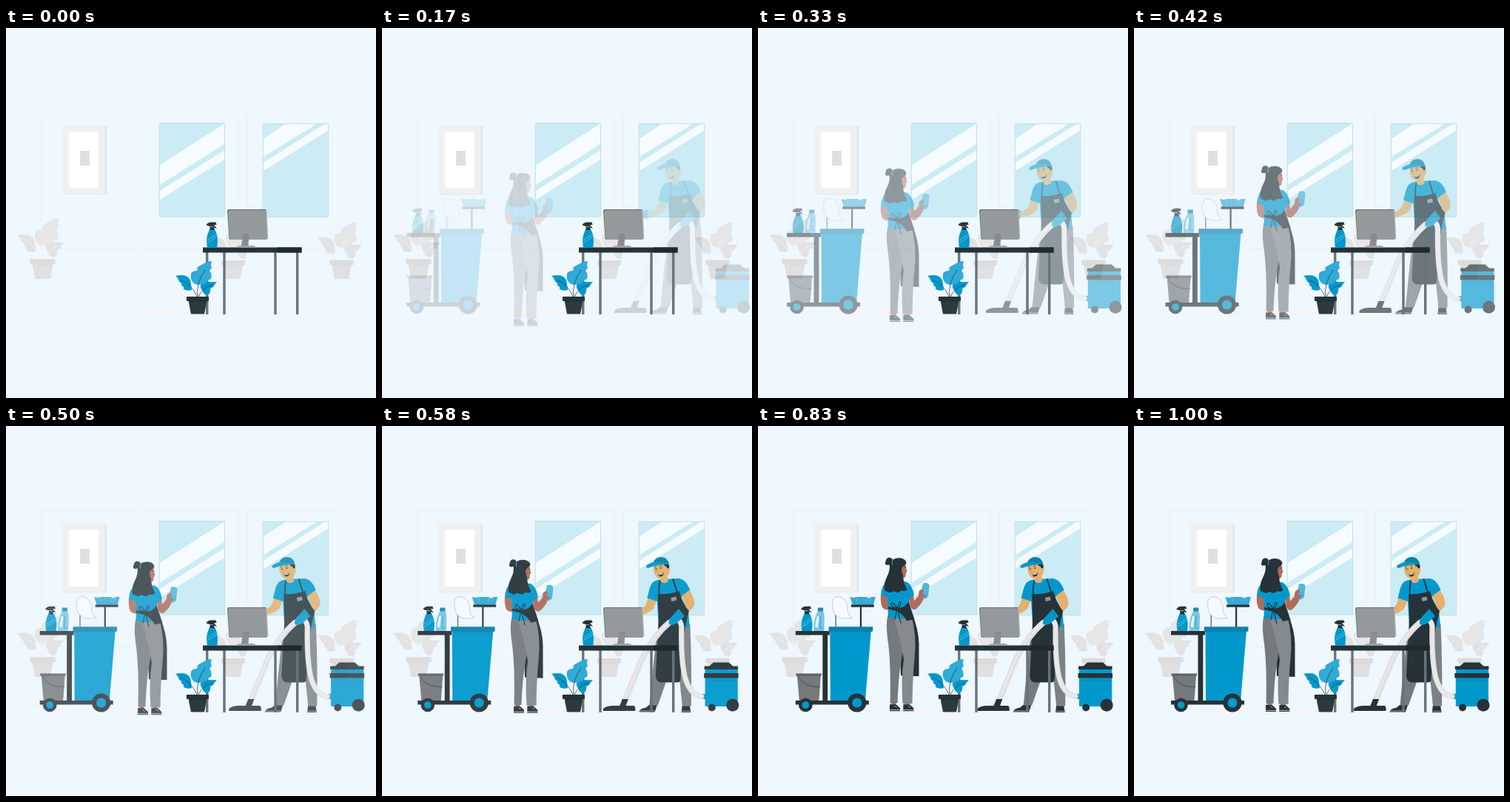
Animation, 500 px wide and 500 px high, one loop 1040 ms. Source, as an HTML page with a canvas:

```html
<!DOCTYPE html>
<html lang="en">
<head>
<meta charset="utf-8">
<title>Office cleaning</title>
<style>
html, body { margin: 0; width: 100%; height: 100%; overflow: hidden; background: #eff7ff; }
canvas { display: block; width: 100vw; height: 100vh; }
</style>
</head>
<body>
<canvas id="stage" width="500" height="500"></canvas>
<script>
const LOOP = 1040, FPS = 24, SIZE = 500;
const BLUE = '#0098cc', DEEP = '#0b80ab', DARK = '#263238', INK = '#1f2a30';
const GREY = '#7b8285', SKIN = '#b26b5b', PEACH = '#e5b06c';

const stage = document.getElementById('stage').getContext('2d');
let g = stage;

function fill(color, d) {
  g.fillStyle = color;
  g.fill(new Path2D(d));
}
function line(color, w, d) {
  g.strokeStyle = color;
  g.lineWidth = w;
  g.lineCap = g.lineJoin = 'round';
  g.stroke(new Path2D(d));
}
function rect(color, x, y, w, h, r = 0) {
  g.fillStyle = color;
  g.beginPath();
  g.roundRect(x, y, w, h, r);
  g.fill();
}
function oval(color, x, y, rx, ry = rx) {
  g.fillStyle = color;
  g.beginPath();
  g.ellipse(x, y, rx, ry, 0, 0, Math.PI * 2);
  g.fill();
}
function at(x, y, draw, s = 1) {
  g.save();
  g.translate(x, y);
  g.scale(s, s);
  draw();
  g.restore();
}
function layer(draw) {
  const c = document.createElement('canvas');
  c.width = c.height = SIZE;
  g = c.getContext('2d');
  draw();
  g = stage;
  return c;
}

// Pot base centre is the origin.
function plant(x, y, s, top, side, stem, rim, pot) {
  at(x, y, () => {
    g.translate(-259, -386.5);
    fill(side, 'M251 354Q246 356 240 353Q241 349 237 348Q238 344 234 343Q233 338 229 335Q238 333 243 335Q250 338 250 346Z');
    fill(side, 'M263 351Q262 344 268 342Q276 344 285 343Q281 347 280 350L276 352Q277 357 273 361Q267 361 266 356Z');
    fill(top, 'M255 346Q248 341 250 332Q252 328 258 328L259 323Q264 320 268 318Q272 315 278 315Q276 320 278 324L275 328Q279 333 277 339L273 341Q270 347 259 347Z');
    line(stem, .7, 'M259 363Q256 345 269 327M258 363Q253 349 237 340M260 363Q265 351 279 347');
    fill(pot, 'M246.5 368H271.5L268 386.5H250Z');
    rect(rim, 244, 363, 30, 6, .5);
    rect(rim, 248, 369, 22.5, 1.6);
  }, s);
}

function sprayBottle(x, y) {
  at(x, y, () => {
    fill(BLUE, 'M4 10H11Q15 17 15 25Q15 31 14 35H1Q0 29 0 24Q1 16 4 10Z');
    line('#7cc8e4', .8, 'M1 24.5Q7 22 12.5 16.5M1.5 27.5Q8 25 14 19');
    rect(DARK, 4.5, 6.5, 6, 4.5);
    fill(DARK, 'M-.5 4Q2 .5 6 .5H12.5L13.5 4H10L14 9L11 8L9 6H4L1 5Z');
  });
}

function windowPane(x, y, w, h, bands) {
  rect('#cbebf5', x, y, w, h);
  bands.forEach(d => fill('#f5fbff', d));
  line('#a9d3e1', .6, `M${x} ${y}h${w}v${h}h${-w}Z`);
}

function room() {
  rect('#eff7ff', 0, 0, SIZE, SIZE);
  [[47.5, 127.5], [187, 127.5], [326.5, 122.5]].forEach(([x, w]) =>
    line('#e9f0f6', .7, `M${x} 115.5h${w}v182.5h${-w}Z`));
  rect('#e3e4e5', 78, 132, 58, 93);
  rect('#f0f0f0', 76, 132, 57.5, 92.5);
  rect('#fff', 85, 140, 40, 76.5);
  rect('#e0e0e0', 100, 166, 13, 20);
  windowPane(207.5, 128.5, 88, 126.5, [
    'M208 185L295.5 129V156.5L208 212Z', 'M208 220L295.5 165V177.5L208 232Z']);
  windowPane(347.5, 129.3, 88, 126.2, [
    'M348 149.5L378 129.5H420L348 174Z', 'M348 181.5L431 129.5H435.5V138.5L348 193Z']);
  oval('#f4f5f7', 222, 385, 162, 4.2);
  const pale = ['#e6e6e6', '#e2e2e2', '#f0f0f0', '#dcdcdc', '#e0e0e0'];
  plant(49.5, 339, 1.14, ...pale);
  plant(307, 339, 1.06, ...pale);
  plant(453.5, 339, 1.07, ...pale);
}

function desk() {
  [270, 293.3, 362.3, 392].forEach(x => rect('#69737a', x, 302, 3.4, 85));
  rect(DARK, 266, 296.5, 133.5, 7);
  rect(INK, 367, 296.5, 32.5, 7);
  sprayBottle(271, 262);
  fill('#5d6367', 'M302 245H350Q352 245 352 247L353 283Q353 286 351 286H304Q302 286 301.5 284L299 248Q299 245 302 245Z');
  fill('#b4b8ba', 'M304 246H350Q352.5 246 352.5 249L354.3 283Q354.3 285.8 352 285.8H304Z');
  fill('#94999c', 'M302 245.8H349.5Q351.2 245.8 351.4 248.5L353 282Q353 285.3 350.5 285.3H304.5Q302.3 285.3 302.1 283L299.8 248.5Q300 245.8 302 245.8Z');
  fill('#888d91', 'M320.5 278H328.5L327.5 294.5H318Z');
  fill('#9a9fa2', 'M312 297Q312 294.3 316 294.2H334Q337 294.5 337.3 297Z');
  plant(259, 386.5, 1, '#30aad6', BLUE, DARK, DARK, '#2c393f');
}

function wheel(x, y, r) {
  oval(DARK, x, y, r);
  oval(BLUE, x, y, r * .52);
}

function cart() {
  const mop = 'M104 231Q113 229 118 238Q121 243 120 249Q121 256 126.5 259Q115 261 109 259Q101 255 100 246Q98 235 104 231Z';
  fill('#75797c', 'M52 337H84L81.5 371H55Z');
  rect('#5c6265', 50.5, 334.5, 34.5, 3);
  line('#3f484d', .9, 'M53 338Q62 354 83 352.5');
  line('#737a7e', 1.6, 'M104.3 250V271');
  fill('#f8fbfe', mop);
  line('#a3b3bc', .6, mop);
  rect(DARK, 137, 243, 2.2, 29);
  fill('#36a9d3', 'M123.5 231L129 232L132 231H146L149 233L152 231H158L155 242H127Z');
  line('#8fcfe6', .6, 'M132 232L133 237M146 232L145 238M152 232L150 237');
  rect(DARK, 125, 241.5, 31, 3.2);
  sprayBottle(57.7, 243.3);
  fill('#7cc6e3', 'M80 250H87Q89 253 89 258L88.5 277.5H74.5Q74 268 76 260Q78 254 80 250Z');
  rect('#1f86b0', 80, 245.5, 7.3, 5, 1);
  fill('#e4f4fb', 'M79 257Q82 256 81.5 260L80 272Q77 273 76.5 269Z');
  line('#45aed6', 1.6, 'M84 257L83 273H87');
  rect(DARK, 50, 277, 46, 5.6);
  rect(DARK, 86.5, 281, 6.8, 92);
  fill(BLUE, 'M96.5 277H152L144 372H97Z');
  fill(DEEP, 'M96.5 277H152L151.8 278.6H96.5Z');
  rect(DEEP, 94.8, 271.2, 59.6, 6.5, .6);
  rect(DARK, 50, 371, 99, 5.6);
  wheel(63.5, 377, 9.3);
  wheel(133, 374, 12.6);
}

function shoe(x) {
  at(x, 376, () => {
    fill(DARK, 'M0 1H8.5L14 6V10H0Z');
    line('#eef2f4', .7, 'M.5 8.4H13.5M7 3L9 5');
  });
}

function woman() {
  rect(SKIN, 180, 372, 6.5, 6);
  rect(SKIN, 198, 372, 7, 6);
  shoe(178);
  shoe(196.3);
  fill(DARK, 'M190 256L208 254Q217 275 217.5 295V339L193 338Z');
  fill('#747a7e', 'M175.5 256H204L196 305Q190 332 188.5 375H178.5Q180 320 175 287Q172.5 268 175.5 256Z');
  fill('#848a8d', 'M188 256H207Q215 284 211.5 315Q209 340 208.5 376H195.5Q193 342 197 316Q193 290 184 262Z');
  fill(SKIN, 'M166 228L175 230L176 243L178.5 249Q172 250 168 246Q165 239 166 228Z');
  fill(SKIN, 'M203.5 231L210 228L211 237L217 230L217.5 224L221 221L225 231Q222 241 213 248.5Q208 250 205.5 244Z');
  fill(BLUE, 'M174 212Q167 215 166 229.5L175 232L176 259Q190 263 206 259L204 235L211 229Q208 214 200 211Z');
  fill(DARK, 'M203.5 238L211.5 262L201 264Q197 256 188 251L176 248V245L189 247Q199 246 203.5 238Z');
  line(DARK, 1.1, 'M188 247Q181 236 180 241Q180 246 188 247Q191 235 193 240Q193 245 188 247L185 262M188 247L193 267');
  fill('#49b4db', 'M223 213.5Q229 211.5 231.5 216L230 230Q229 235 222 234L219.5 229Z');
  line('#7ac8e4', .8, 'M223 217L229 218M222 222L229 223');
  fill(SKIN, 'M216.5 229L222 221L224.5 223L221.5 228L227 229L223 234Z');
  fill(SKIN, 'M191 190Q196 185 199.5 187L200.5 194L201.5 197L200 199Q200 206 196 206.5L190 211Z');
  fill(DARK, 'M181 182Q187 178 194 179.5Q200 181 200.5 186L198 189L194.5 192Q193.5 198 196 202Q196 212 201.5 222Q198 225 194 223L189 226L183 224L178 226L171 223Q169 215 174 205Q179 196 177.5 187Z');
  oval(DARK, 177.5, 183.5, 4.8, 5);
  oval(DARK, 174.5, 186, 2.6);
  line('#36a9d3', 1, 'M182.3 181Q180.5 184 181.5 188');
  line(INK, .7, 'M198 192H199.5');
}

function vacuum() {
  line('#d8eaf3', 1.2, 'M480 345Q482 357 479.5 369');
  rect(BLUE, 428, 362, 8, 7, 1);
  fill(DARK, 'M439 326L446 319.5H467L474 326Z');
  rect(DARK, 433.8, 324.5, 45.6, 4.8, .6);
  rect(BLUE, 434.8, 329, 44.2, 50, 1.5);
  rect(DARK, 433.3, 334, 46.6, 6.5, .5);
  line(DEEP, .8, 'M437 343.5H477');
  oval(DARK, 444, 380.5, 5);
  oval(DARK, 472, 377.3, 8.5);
}

function man() {
  const hose = 'M385 267Q400 254 403 271Q402 315 407.5 339Q414 363 430 365.5';
  fill(DARK, 'M359 377H370L367 386.5H345.5Q346 382 355 380.5Z');
  fill(DARK, 'M404 377H414L415.5 387H402.8Z');
  line('#e4e9ec', .6, 'M346 385H367M403.5 385.4H414.5');
  fill('#747a7e', 'M369 285H393L382 346L371 377.5H359.5Q364 330 369 285Z');
  fill(GREY, 'M390 280L414.5 267Q417 325 416 378.5H404L399 330Z');
  rect(BLUE, 335, 246, 9, 12, 2);
  fill(PEACH, 'M358 231L369.5 235L365 247Q356 255 343 256L342 249Q351 247 355 241Z');
  fill(BLUE, 'M374 207.5Q363 208 360 219L356.5 232.5L370 237L372 272H414L412 248L402 232L414.5 222Q409 207 399 206Z');
  fill(PEACH, 'M403 230L413.5 222Q422 234 420 243L407 258L400 250L408.5 242Z');
  fill(DARK, 'M371 227Q386 228 400 223Q404 240 413 250Q406 275 404 300L401.5 343Q401 346.5 397 346.5H375Q369 346 368 338L372 262Z');
  line(DARK, 1.8, 'M374 210Q372 218 373 228M391.5 207L397 225');
  line('#3d494f', .7, 'M374 292L384 283');
  fill('#8b969c', 'M388.5 232L395.5 230.5L396.5 235.5L389.5 237Z');
  line('#e0e0e0', 8, 'M327 370L350 314Q366 283 386 266');
  line('#ebebeb', 2, 'M327.5 367L350 313Q366 283 384 267');
  line('#dedede', 7.2, hose);
  line('#e9e9e9', 4.8, hose);
  fill(BLUE, 'M399 247L407 257L398 265Q392 270.5 386 268Q384.5 262 391 256Z');
  line(DEEP, 1, 'M397.5 250L404 258M390 264L395 260');
  fill(DARK, 'M323 369H331L327.5 379H319Z');
  fill(DARK, 'M297 385V382Q302 378 310 378H338Q340 378 340.5 381V385Z');

  fill(PEACH, 'M366 186L384 186Q387 190 387 195Q386 201 384 203L385 210Q380 214 375 210.5V206.5Q368 206 366.5 199Q364 196 366 186Z');
  fill(INK, 'M379 185L386 186.5Q387 190 386 193L383.5 192Q383 189 380 189Z');
  oval(PEACH, 385.3, 195, 2, 2.8);
  oval(INK, 368.5, 193.3, .8, 1);
  oval(INK, 375.2, 192, .8, 1);
  line(INK, .7, 'M366.5 191L368.5 190M373.5 189.6L376 189');
  line('#c98b58', .7, 'M371 193L369.5 197L371.5 197.4');
  fill(INK, 'M371 200.5Q376 201 379 197.5Q379 203 374.5 203.5Q372 203 371 200.5Z');
  line('#fff', .9, 'M372.5 201Q376 201 378 199.3');
  fill(DEEP, 'M365 185Q367 177 376 177Q385.5 178 386 188Q376 184 365 187Z');
  fill(BLUE, 'M365 184Q374 183 386 187Q370 187 358 192Q354 191.5 355.5 188.5Q359 185.5 365 184Z');
}

// Keys are [frame, value]; smooth curve through them.
function track(keys, n) {
  const last = keys.length - 1;
  if (n >= keys[last][0]) return keys[last][1];
  let i = 0;
  while (n >= keys[i + 1][0]) i++;
  const slope = k => {
    const a = keys[Math.max(k - 1, 0)], b = keys[Math.min(k + 1, last)];
    return (b[1] - a[1]) / (b[0] - a[0]);
  };
  const [x0, y0] = keys[i], [x1, y1] = keys[i + 1];
  const h = x1 - x0, u = (n - x0) / h, v = 1 - u;
  return v * v * (1 + 2 * u) * y0 + u * u * (3 - 2 * u) * y1 +
    h * u * v * (v * slope(i) - u * slope(i + 1));
}
const SHIFT = [[0, 20], [2, 18.6], [6, 14.5], [8, 11], [12, 4.3], [16, 0], [20, -.8], [24, 0]];
const FADE = [[0, 0], [2, .06], [6, .32], [8, .48], [12, .81], [15, 1]];

const back = layer(room), front = layer(desk);

function render(now) {
  const n = Math.min(24, Math.floor((now % LOOP) * FPS / 1000 + .1));
  stage.globalAlpha = 1;
  stage.drawImage(back, 0, 0);
  if (n > 1) {
    const d = track(SHIFT, n);
    const crew = layer(() => {
      at(-d, 0, cart);
      at(0, d, woman);
      at(d, 0, () => { vacuum(); man(); });
    });
    stage.globalAlpha = Math.min(1, track(FADE, n));
    stage.drawImage(crew, 0, 0);
    stage.globalAlpha = 1;
  }
  stage.drawImage(front, 0, 0);
}

const start = performance.now();
function tick() {
  render(performance.now() - start);
  requestAnimationFrame(tick);
}
tick();
</script>
</body>
</html>
```
